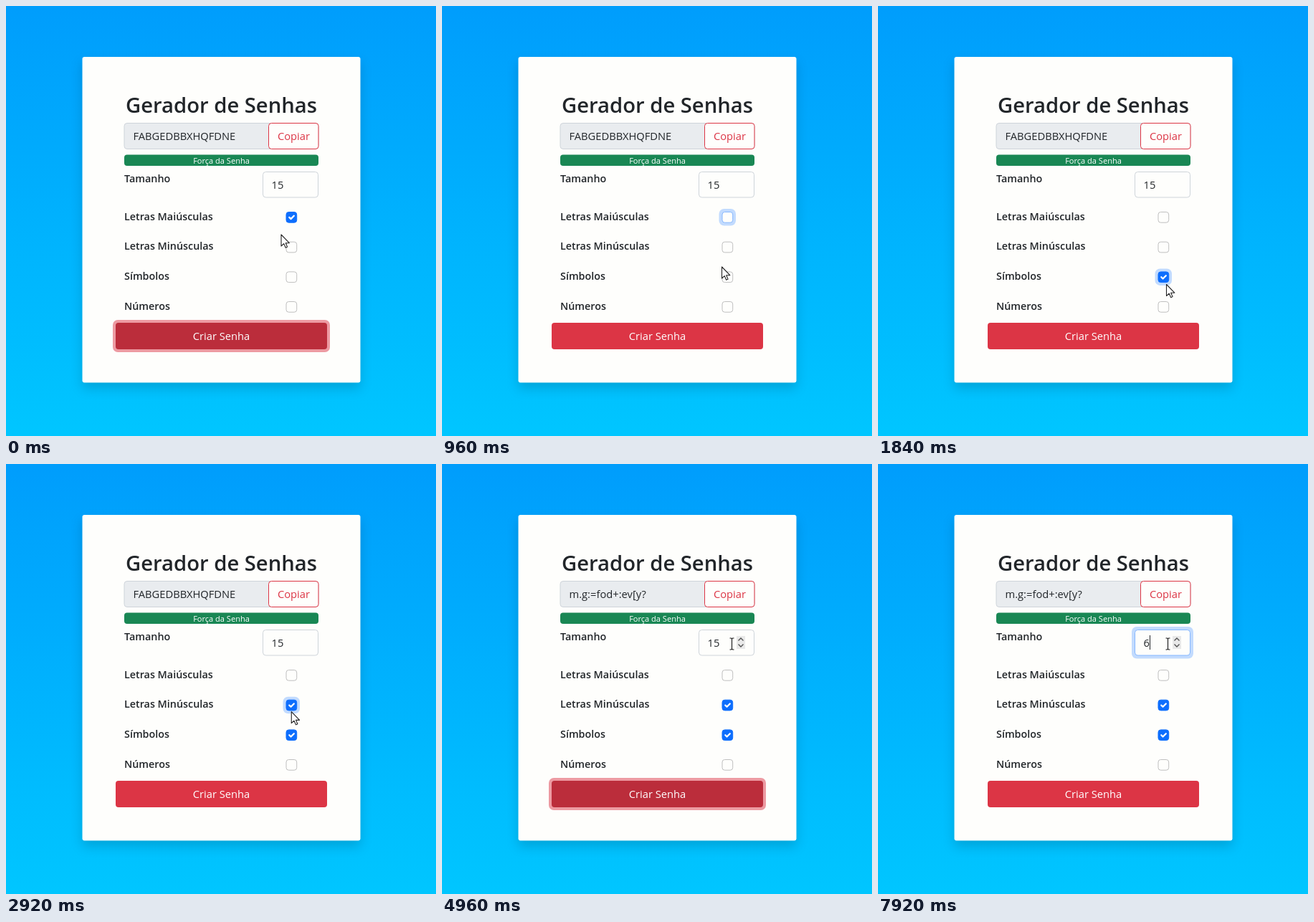
Animation of 600 by 600 pixels, one loop 8 s. Source, as an HTML page:

```html
<!DOCTYPE html>
<html lang="pt-BR">
<head>
<meta charset="utf-8">
<title>Gerador de Senhas</title>
<style>
  html, body { margin: 0; width: 100%; height: 100%; overflow: hidden; }
  svg { display: block; width: 100vw; height: 100vh; }
  text { font: 14.7px "Open Sans", "Noto Sans", sans-serif; fill: #212529; white-space: pre; }
  .title { font-size: 29.2px; font-weight: 600; }
  .label { font-size: 14.35px; font-weight: 600; }
  .small { font-size: 11.05px; fill: #fff; }
  .mid { text-anchor: middle; }
  .card { filter: drop-shadow(0 8px 8px rgba(0, 0, 0, .15)); }
  .tick { fill: none; stroke: #fff; stroke-width: 2.3; stroke-linecap: round; stroke-linejoin: round; }
  .pointer { fill: #fff; stroke: #222; stroke-width: 1.1; stroke-linejoin: round; }
  .chevron { fill: none; stroke: #555; stroke-width: 1.4; }
</style>
</head>
<body>
<svg viewBox="0 0 600 600">
  <defs>
    <linearGradient id="sky" x2="0" y2="1">
      <stop stop-color="#009dfc"/>
      <stop offset="1" stop-color="#00c6ff"/>
    </linearGradient>
  </defs>
  <rect width="600" height="600" fill="url(#sky)"/>
  <rect class="card" x="106.5" y="71" width="388" height="454.5" rx="3" fill="#fefefc"/>
  <text class="title mid" x="300.5" y="149">Gerador de Senhas</text>

  <rect x="165" y="163.5" width="271" height="36" rx="4" fill="#e9ecef" stroke="#ced4da"/>
  <text id="password" x="177.5" y="187"></text>
  <rect x="366.5" y="163.5" width="69.5" height="36" rx="4" fill="#fefefc" stroke="#dc3545"/>
  <text class="mid" x="401.5" y="187" style="fill:#dc3545">Copiar</text>

  <rect x="165" y="207.5" width="271" height="15.5" rx="4" fill="#198754"/>
  <text class="small mid" x="300.5" y="219.7">Força da Senha</text>

  <text class="label" x="165" y="246">Tamanho</text>
  <rect id="sizeRing" x="354" y="227" width="86" height="44.5" rx="7" fill="#c2dbfe"/>
  <rect id="sizeBox" x="358.5" y="231.5" width="77" height="35.5" rx="4" fill="#fefefc"/>
  <rect id="selection" x="370.5" y="238.5" width="16.5" height="21.5" fill="#2f8cf2"/>
  <text id="size" x="370.5" y="255"></text>
  <path id="caret" d="M0 239V259" stroke="#212529"/>
  <g id="spinner">
    <rect x="411" y="240" width="12" height="18" fill="#e9e9e9"/>
    <path class="chevron" d="M413.5 246.5l3.5-3.5l3.5 3.5M413.5 251.5l3.5 3.5l3.5-3.5"/>
  </g>

  <g id="options"></g>

  <rect id="buttonRing" x="149" y="438" width="303" height="45" rx="7" fill="#ed9aa2"/>
  <rect id="button" x="153" y="442" width="295" height="37" rx="4"/>
  <text class="mid" x="300.5" y="466" style="fill:#fff">Criar Senha</text>

  <g id="cursor">
    <path id="arrow" class="pointer" d="M0 0V16L3.7 12.6L6.2 18.2L8.6 17.1L6.2 11.7H11.3Z"/>
    <path id="hand" class="pointer" d="M-1.7 13V1.5Q-1.7 0 0 0T1.7 1.5V7Q4.5 5.8 5 8Q7.5 7 8.2 9Q11 8.5 11 11V15Q11 18 9 20V22H0V20Q-3 17 -5.5 13.5Q-6 10.5 -3.8 11.2ZM1.7 7V11M5 8V11.5M8.2 9V12"/>
    <path id="beam" fill="none" stroke="#222" stroke-width="1.2" d="M-3 -8H-1L0 -7L1 -8H3M0 -7V7M-3 8H-1L0 7L1 8H3"/>
  </g>
</svg>
<script>
const LOOP = 8000, STEP = 40;
const UNCHECK_UPPER = 680, CHECK_SYMBOLS = 1400, CHECK_LOWER = 2400,
      CREATE = 4000, HOVER_SIZE = 4960, SELECT_SIZE = 6000, CLEAR_SIZE = 6640, TYPE_SIZE = 7800;

// Pointer stops: time, x, y
const path = [
  [0, 384, 319], [80, 384, 319], [400, 394, 295], [760, 395, 296],
  [960, 390.5, 364], [1240, 398, 375], [1520, 399, 379], [1720, 399, 379],
  [1840, 402.5, 388.5], [1960, 402, 386], [2320, 398, 330], [2520, 397.5, 328],
  [2640, 398, 334], [2840, 398, 334], [3080, 399, 379], [3240, 399, 379],
  [3480, 342, 463], [3960, 342, 463], [4000, 344, 466], [4680, 344, 466],
  [4960, 404.5, 251], [LOOP, 404.5, 251]
];

const options = [
  { label: "Letras Maiúsculas", y: 287, checked: t => t < UNCHECK_UPPER, focus: [UNCHECK_UPPER, CHECK_SYMBOLS] },
  { label: "Letras Minúsculas", y: 328.7, checked: t => t >= CHECK_LOWER, focus: [CHECK_LOWER, CREATE] },
  { label: "Símbolos", y: 370.4, checked: t => t >= CHECK_SYMBOLS, focus: [CHECK_SYMBOLS, CHECK_LOWER] },
  { label: "Números", y: 412, checked: () => false, focus: [0, 0] }
];

const $ = id => document.getElementById(id);
const show = (node, on) => { node.style.display = on ? "" : "none"; };
const set = (node, attrs) => { for (const k in attrs) node.setAttribute(k, attrs[k]); };

$("options").innerHTML = options.map(({ label, y }) => `
  <text class="label" x="165" y="${y + 11.7}">${label}</text>
  <g transform="translate(390.5 ${y})">
    <rect class="ring" x="-4" y="-4" width="23.5" height="23.5" rx="7" fill="#c2dbfe"/>
    <rect class="box" x=".5" y=".5" width="14.7" height="14.7" rx="3.5"/>
    <path class="tick" d="M4.8 7.9L7 10.1L11.3 5.8"/>
  </g>`).join("");
options.forEach((option, i) => { option.node = $("options").querySelectorAll("g")[i]; });

function pointerAt(t) {
  const i = path.findIndex(p => p[0] > t);
  const [t0, x0, y0] = path[i - 1], [t1, x1, y1] = path[i];
  const u = (t - t0) / (t1 - t0), e = u * u * (3 - 2 * u);
  return [x0 + (x1 - x0) * e, y0 + (y1 - y0) * e];
}

function render(t) {
  for (const { node, checked, focus } of options) {
    const on = checked(t), focused = t >= focus[0] && t < focus[1];
    show(node.querySelector(".ring"), focused);
    show(node.querySelector(".tick"), on);
    set(node.querySelector(".box"), {
      fill: on ? "#0d6efd" : "#fefefc",
      stroke: on ? "#0d6efd" : focused ? "#86b7fe" : "#bfbfbf"
    });
  }

  const buttonFocus = t < UNCHECK_UPPER || (t >= CREATE && t < SELECT_SIZE);
  show($("buttonRing"), buttonFocus);
  set($("button"), { fill: buttonFocus ? "#bb2d3b" : "#dc3545" });
  $("password").textContent = t < CREATE ? "FABGEDBBXHQFDNE" : "m.g:=fod+:ev[y?";

  const sizeFocus = t >= SELECT_SIZE, selected = sizeFocus && t < CLEAR_SIZE;
  show($("sizeRing"), sizeFocus);
  set($("sizeBox"), { stroke: sizeFocus ? "#86b7fe" : "#ced4da" });
  show($("selection"), selected);
  $("size").textContent = t < CLEAR_SIZE ? "15" : t < TYPE_SIZE ? "" : "6";
  $("size").style.fill = selected ? "#fff" : "";
  show($("caret"), t >= CLEAR_SIZE);
  set($("caret"), { transform: `translate(${t < TYPE_SIZE ? 371.5 : 379.5} 0)` });
  show($("spinner"), t >= HOVER_SIZE);

  const [x, y] = pointerAt(t);
  const beam = t >= HOVER_SIZE, hand = !beam && y > 442;
  show($("beam"), beam);
  show($("hand"), hand);
  show($("arrow"), !beam && !hand);
  set($("cursor"), { transform: `translate(${x} ${y})` });
}

function frame() {
  render(Math.floor(performance.now() % LOOP / STEP) * STEP);
  requestAnimationFrame(frame);
}
frame();
</script>
</body>
</html>
```
